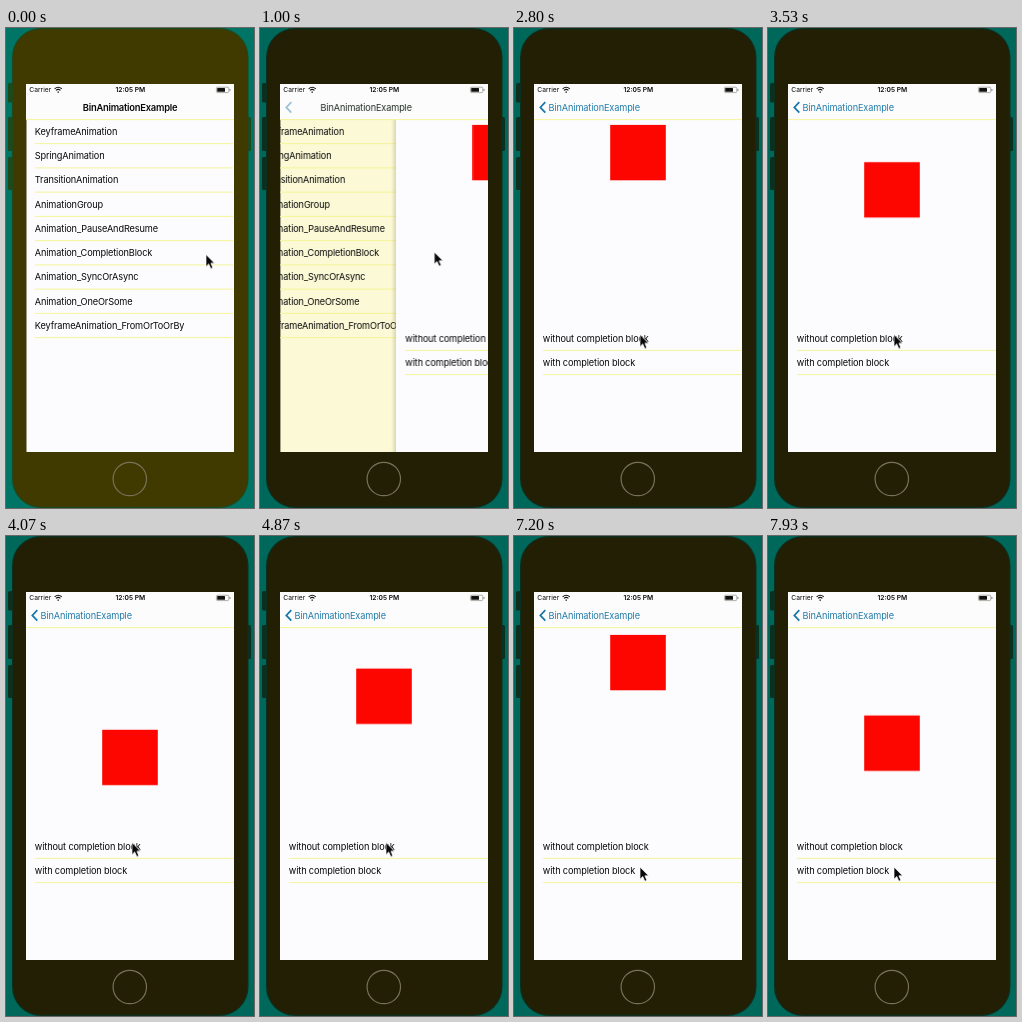
An HTML page that plays this animation: 248x480 px, repeating every 8 s.

```html
<!DOCTYPE html>
<html lang="en">
<head>
<meta charset="utf-8">
<title>BinAnimationExample</title>
<style>
  html, body { margin: 0; width: 100%; height: 100%; overflow: hidden; background: #00685a; }
  svg { display: block; width: 100vw; height: 100vh; }
  text { font-family: Inter, Roboto, sans-serif; font-size: 9.2px; letter-spacing: -.14px; fill: #080808; }
  .status text { font-size: 6.7px; letter-spacing: 0; }
  .status .clock { font-weight: 600; text-anchor: middle; }
  .sep { stroke: #f4f49a; stroke-width: 1; }

  .backdrop { animation: backdrop 8s infinite step-end; }
  .device { animation: device 8s infinite step-end; }
  .buttons { animation: buttons 8s infinite step-end; }
  .slide { animation: slide 8s infinite; }
  .fade-in { animation: fade-in 8s infinite; }
  .fade-in-fast { animation: fade-in-fast 8s infinite; }
  .list { --to: -62px; }
  .page { --from: 207px; }
  .back-label { --from: 46px; animation: slide 8s infinite, fade-in-fast 8s infinite, tint 8s infinite; }
  .title { --to: -36px; font-size: 9.4px; font-weight: 600; text-anchor: middle; letter-spacing: -.24px;
    animation: slide 8s infinite, fade-out-fast 8s infinite; }
  .box { animation: bounce 8s infinite linear; }
  .cursor { animation: cursor 8s infinite ease-in-out; }

  @keyframes backdrop { 0% { fill: #007565; } 11.625%, 100% { fill: #00685a; } }
  @keyframes device { 0% { fill: #403a00; } 11.625%, 100% { fill: #231f05; } }
  @keyframes buttons { 0% { fill: #1c4a1c; } 11.625%, 100% { fill: #0c3020; } }

  /* navigation push: 914 ms to 1414 ms */
  @keyframes slide {
    0%, 11.425% { transform: translateX(var(--from, 0px)); animation-timing-function: cubic-bezier(.36, .66, .04, 1); }
    17.675%, 100% { transform: translateX(var(--to, 0px)); }
  }
  @keyframes fade-in {
    0%, 11.425% { opacity: 0; animation-timing-function: cubic-bezier(.36, .66, .04, 1); }
    17.675%, 100% { opacity: 1; }
  }
  @keyframes fade-in-fast { 0%, 11.425% { opacity: 0; } 12.4%, 100% { opacity: 1; } }
  @keyframes fade-out-fast { 0%, 11.425% { opacity: 1; } 12.4%, 100% { opacity: 0; } }
  @keyframes tint { 0%, 11.9% { fill: #202010; } 17%, 100% { fill: #217ba8; } }

  /* one second down, one second back; the second run is cut by the loop */
  @keyframes bounce {
    0%, 39.925% { transform: translateY(0); }
    52.425% { transform: translateY(110.4px); }
    64.925%, 89.79% { transform: translateY(0); }
    100% { transform: translateY(90.2px); }
  }
  @keyframes cursor {
    0%, 1% { transform: translate(200px, 226.5px); }
    9%, 13.5% { transform: translate(174.3px, 224px); }
    27%, 68% { transform: translate(126px, 306.5px); }
    78%, 100% { transform: translate(126px, 331px); }
  }
</style>
</head>
<body>
<svg viewBox="0 0 248 480" preserveAspectRatio="none">
  <defs>
    <clipPath id="screen"><rect x="20.5" y="56" width="207" height="368"/></clipPath>
    <linearGradient id="shadow">
      <stop offset="0" stop-color="#a09a60" stop-opacity="0"/>
      <stop offset="1" stop-color="#a09a60" stop-opacity=".4"/>
    </linearGradient>
  </defs>

  <rect class="backdrop" width="248" height="480"/>
  <g class="buttons">
    <rect x="2" y="55" width="8" height="19.5" rx="1.5"/>
    <rect x="2" y="89" width="8" height="34" rx="1.5"/>
    <rect x="2" y="129" width="8" height="33" rx="1.5"/>
    <rect x="238" y="89" width="7" height="34" rx="1.5"/>
    <rect x="6" y="0" width="236.5" height="480" rx="29"/>
  </g>
  <rect class="device" x="7.2" y="1.2" width="234.1" height="477.6" rx="27.8"/>
  <circle cx="123.8" cy="451" r="16.7" fill="none" stroke="#77715a" stroke-width="1.2"/>

  <g clip-path="url(#screen)">
    <rect x="20" y="56" width="208" height="368" fill="#fcfcfe"/>
    <rect class="fade-in" x="20" y="91" width="208" height="333" fill="#f8f4a2"/>
    <g class="slide list" id="list"></g>
    <g class="slide page">
      <rect class="fade-in-fast" x="15" y="91" width="5" height="333" fill="url(#shadow)"/>
      <rect x="20" y="91" width="208" height="333" fill="#fcfcfe"/>
      <g id="page"></g>
      <rect class="box" x="96.2" y="96.9" width="55.6" height="55.4" fill="#fd0600"/>
    </g>

    <rect x="20" y="56" width="208" height="35.4" fill="#fcfcfd"/>
    <path class="sep" d="M20 91.6H228"/>
    <path class="fade-in" d="M31.3 74.2L26.3 79.4L31.3 84.6" fill="none" stroke="#1776a8" stroke-width="1.7"/>
    <text class="title" x="124" y="82.6">BinAnimationExample</text>
    <text class="back-label" x="34.6" y="82.6">BinAnimationExample</text>

    <g class="status">
      <text x="23.3" y="64.3">Carrier</text>
      <text class="clock" x="124.3" y="64.3">12:05 PM</text>
      <g fill="none" stroke="#111" stroke-width="1.1">
        <path d="M48.6 60.8Q52.2 57.6 55.8 60.8M50 62.4Q52.2 60.4 54.4 62.4"/>
        <path d="M51.5 64.1H52.9"/>
      </g>
      <rect x="210.4" y="59.2" width="12.4" height="5.4" rx="1.2" fill="none" stroke="#77776a" stroke-width=".6"/>
      <rect x="211.2" y="60" width="7.8" height="3.8" rx=".5" fill="#111"/>
      <rect x="223.5" y="61" width=".9" height="1.9" fill="#77776a"/>
    </g>
  </g>

  <path class="cursor" d="M0 0V12.2L2.8 9.6L4.8 14.2L6.9 13.3L4.9 8.8H8.6Z"
    fill="#080808" stroke="#fff" stroke-width=".7"/>
</svg>
<script>
  const ROW = 24.25;

  function addRows(id, top, labels) {
    document.getElementById(id).innerHTML = labels.map((label, i) => {
      const y = top + i * ROW;
      return `<text x="28.8" y="${y + 15.4}">${label}</text>
        <path class="sep" d="M29 ${y + ROW}H228"/>`;
    }).join('');
  }

  addRows('list', 91.4, [
    'KeyframeAnimation', 'SpringAnimation', 'TransitionAnimation', 'AnimationGroup',
    'Animation_PauseAndResume', 'Animation_CompletionBlock', 'Animation_SyncOrAsync',
    'Animation_OneOrSome', 'KeyframeAnimation_FromOrToOrBy'
  ]);
  addRows('page', 298.1, ['without completion block', 'with completion block']);
</script>
</body>
</html>
```
